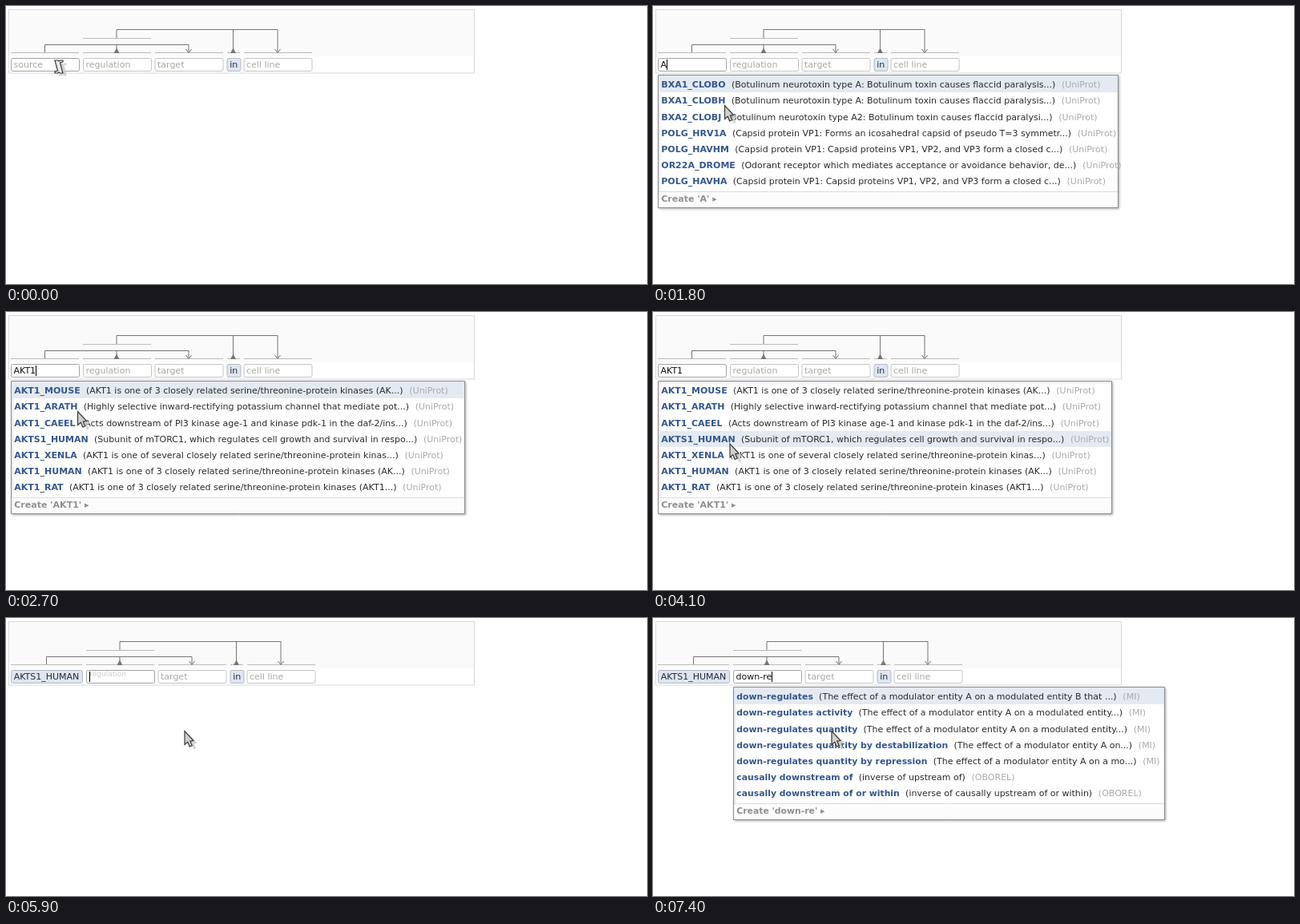
An HTML page with a canvas for the animation above (8000 ms loop, 800 by 348 pixels).

```html
<!DOCTYPE html>
<html lang="en">
<head>
<meta charset="utf-8">
<title>Sentence editor with autocomplete</title>
<style>
html, body { margin: 0; width: 100%; height: 100%; overflow: hidden; background: #fff; }
canvas { display: block; }
</style>
</head>
<body>
<canvas id="stage" width="800" height="348"></canvas>
<script>
const ctx = document.getElementById('stage').getContext('2d');
const LOOP = 8000, STEP = 100;
const FAMILY = '"DejaVu Sans", Verdana, sans-serif';
const ROW_TOP = 88, ROW_H = 20.2;
const GREY = '#757575';

// Suggestion lists: rows are [id, description, origin]
const uni = rows => rows.map(r => [...r, '(UniProt)']);
const lists = {
  A: { right: 581, bold: 11, rows: uni([
    ['BXA1_CLOBO', '(Botulinum neurotoxin type A: Botulinum toxin causes flaccid paralysis...)'],
    ['BXA1_CLOBH', '(Botulinum neurotoxin type A: Botulinum toxin causes flaccid paralysis...)'],
    ['BXA2_CLOBJ', '(Botulinum neurotoxin type A2: Botulinum toxin causes flaccid paralysi...)'],
    ['POLG_HRV1A', '(Capsid protein VP1: Forms an icosahedral capsid of pseudo T=3 symmetr...)'],
    ['POLG_HAVHM', '(Capsid protein VP1: Capsid proteins VP1, VP2, and VP3 form a closed c...)'],
    ['OR22A_DROME', '(Odorant receptor which mediates acceptance or avoidance behavior, de...)'],
    ['POLG_HAVHA', '(Capsid protein VP1: Capsid proteins VP1, VP2, and VP3 form a closed c...)']]) },
  AKT1: { right: 573, bold: 11, rows: uni([
    ['AKT1_MOUSE', '(AKT1 is one of 3 closely related serine/threonine-protein kinases (AK...)'],
    ['AKT1_ARATH', '(Highly selective inward-rectifying potassium channel that mediate pot...)'],
    ['AKT1_CAEEL', '(Acts downstream of PI3 kinase age-1 and kinase pdk-1 in the daf-2/ins...)'],
    ['AKTS1_HUMAN', '(Subunit of mTORC1, which regulates cell growth and survival in respo...)'],
    ['AKT1_XENLA', '(AKT1 is one of several closely related serine/threonine-protein kinas...)'],
    ['AKT1_HUMAN', '(AKT1 is one of 3 closely related serine/threonine-protein kinases (AK...)'],
    ['AKT1_RAT', '(AKT1 is one of 3 closely related serine/threonine-protein kinases (AKT1...)']]) },
  down: { right: 688, bold: 10.83, rows: [
    ['does not overlap sequence of', '(x does not overlaps the sequence of x if and only i...)', '(OBOREL)'],
    ['downstream in neural circuit with', '(A relation that holds between a neuron that is...)', '(OBOREL)'],
    ['causally downstream of', '(inverse of upstream of)', '(OBOREL)'],
    ['causally downstream of or within', '(inverse of causally upstream of or within)', '(OBOREL)'],
    ['immediately causally downstream of', '', '(OBOREL)'],
    ['is downstream of sequence of', '(x is downstream of the sequence of y iff either (1)...)', '(OBOREL)'],
    ['is immediately downstream of sequence of', '(x is immediately downstream of the sequ...)', '(OBOREL)']] },
  regulates: { right: 639, bold: 10.83, rows: [
    ['down-regulates', '(The effect of a modulator entity A on a modulated entity B that ...)', '(MI)'],
    ['down-regulates activity', '(The effect of a modulator entity A on a modulated entity...)', '(MI)'],
    ['down-regulates quantity', '(The effect of a modulator entity A on a modulated entity...)', '(MI)'],
    ['down-regulates quantity by destabilization', '(The effect of a modulator entity A on...)', '(MI)'],
    ['down-regulates quantity by repression', '(The effect of a modulator entity A on a mo...)', '(MI)'],
    ['causally downstream of', '(inverse of upstream of)', '(OBOREL)'],
    ['causally downstream of or within', '(inverse of causally upstream of or within)', '(OBOREL)']] }
};
lists.AKT = { ...lists.AKT1, rows: [3, 0, 1, 2, 5, 6, 4].map(i => lists.AKT1.rows[i]) };

// What is typed and which list is open: [time, text, list]
const typing = [
  [0, ''], [1700, 'A'], [1800, 'A', 'A'], [1900, 'AK', 'A'], [2000, 'AK', 'AKT'],
  [2200, 'AKT', 'AKT'], [2700, 'AKT1', 'AKT1'], [5500, ''],
  [6500, 'd'], [6600, 'd', 'down'], [6700, 'do', 'down'], [6800, 'dow', 'down'],
  [7000, 'down', 'down'], [7100, 'down-', 'regulates'], [7300, 'down-r', 'regulates'],
  [7400, 'down-re', 'regulates']
];

// Pointer path: [time, x, y]
const path = [
  [0, 66, 76], [100, 65, 74], [500, 65, 74], [1000, 89.5, 124.5], [3600, 89.5, 124.5],
  [4100, 96, 165], [4200, 96, 165], [4400, 150, 158], [4700, 276, 175],
  [5000, 223, 160], [5400, 223, 160], [5900, 223, 141.5], [LOOP, 223, 141.5]
];

function pointerAt(t) {
  const i = path.findIndex(p => p[0] > t);
  const [t0, x0, y0] = path[i - 1], [t1, x1, y1] = path[i];
  const k = (t - t0) / (t1 - t0);
  return [x0 + (x1 - x0) * k, y0 + (y1 - y0) * k];
}

// Draws text and returns the x where it ends
function text(str, x, y, color, size = 11, weight = '') {
  ctx.font = `${weight} ${size}px ${FAMILY}`;
  ctx.fillStyle = color;
  ctx.fillText(str, x, y);
  return x + ctx.measureText(str).width;
}

function line(color, ...pts) {
  ctx.strokeStyle = color;
  ctx.lineWidth = 1;
  ctx.beginPath();
  pts.forEach(([x, y]) => ctx.lineTo(x, y));
  ctx.stroke();
}

function shape(pts, fill, stroke) {
  ctx.beginPath();
  pts.forEach(([x, y]) => ctx.lineTo(x, y));
  ctx.closePath();
  ctx.fillStyle = fill;
  ctx.fill();
  if (!stroke) return;
  ctx.strokeStyle = stroke;
  ctx.lineWidth = 1.2;
  ctx.stroke();
}

function box(x, y, w, h, fill, stroke, r = 2) {
  ctx.beginPath();
  ctx.roundRect(x, y, w, h, r);
  ctx.fillStyle = fill;
  ctx.fill();
  ctx.strokeStyle = stroke;
  ctx.lineWidth = 1;
  ctx.stroke();
}

function connectors(cx, d) {
  const [src, reg, tgt, link, cell] = cx;
  line('#bbb', [96 + d, 40.5], [181 + d, 40.5]);
  line(GREY, [reg, 40], [reg, 29.5], [cell, 29.5], [cell, 58]);
  line(GREY, [link, 29.5], [link, 54]);
  line(GREY, [src, 58], [src, 48.5], [tgt, 48.5], [tgt, 58]);
  line(GREY, [reg, 48.5], [reg, 54]);
  for (const x of [reg, link]) shape([[x, 52.5], [x + 3.5, 59], [x - 3.5, 59]], GREY);
  for (const x of [tgt, cell]) line(GREY, [x - 3.5, 54], [x, 58.5], [x + 3.5, 54]);
}

function field(x, label, state) {
  box(x, 65.5, 85, 16, '#fff', state.dark ? '#a2a2a2' : '#c4c4c4');
  if (state.value) text(state.value, x + 3, 77, '#111');
  else if (state.focus) text(label, x + 3.7, 73, '#ccc', 9);
  else text(label, x + 3, 77, '#a9a9a0');
  if (state.caret) {
    ctx.font = `11px ${FAMILY}`;
    const end = x + 3 + ctx.measureText(state.value).width;
    ctx.fillStyle = '#000';
    ctx.fillRect(Math.round(end), 67, 1, 13);
  }
}

function tag(x, w, label) {
  box(x, 65.5, w, 16, '#dfe6f0', '#b4bac6');
  text(label, x + 3.2, 77, '#222b3a');
}

function menu(x, { right, bold, rows }, typed, selected) {
  ctx.save();
  ctx.shadowColor = 'rgba(0,0,0,.3)';
  ctx.shadowBlur = 3;
  ctx.shadowOffsetX = ctx.shadowOffsetY = 1;
  box(x, 86.5, right - x - .5, 166, '#fff', '#8c8c8c', 0);
  ctx.restore();
  ctx.fillStyle = '#fcfcfc';
  ctx.fillRect(x + .5, 233, right - x - 1.5, 19);
  line('#ddd', [x + .5, 232.5], [right - 1, 232.5]);
  ctx.fillStyle = '#e4eaf2';
  ctx.fillRect(x + .5, Math.round(ROW_TOP + selected * ROW_H), right - x - 1.5, 20);
  rows.forEach(([id, about, origin], i) => {
    const y = Math.round(102.2 + i * ROW_H);
    let end = text(id, x + 3.8, y, '#34568f', bold, 'bold') + 7.3;
    if (about) end = text(about, end, y, '#2a2a2a') + 7.7;
    text(origin, end, y, '#aaa');
  });
  text(`Create '${typed}' ▸`, x + 3.8, 245, '#8f8f8f', bold, 'bold');
}

function pointer(x, y, beam) {
  const half = [[-5, -8], [-1.5, -8], [0, -7], [1.5, -8], [5, -8], [5, -6], [1.5, -5]];
  const pts = beam
    ? [...half, ...half.map(([a, b]) => [-a, -b])]
    : [[0, 0], [0, 17], [3.8, 13.7], [6.3, 19.5], [9.3, 18.2], [6.8, 12.6], [11, 12]];
  const at = (dx, dy) => pts.map(([a, b]) => [x + a + dx, y + b + dy]);
  shape(at(5, 3.5), 'rgba(205,205,205,.85)');
  shape(at(0, 0), beam ? '#e8e8e8' : '#cfcfcf', '#3a3a3a');
}

function draw(t) {
  const [px, py] = pointerAt(t);
  const [, value, open] = typing.filter(k => k[0] <= t).pop();
  const chosen = t >= 5500;
  const d = chosen ? 4 : 0;
  const focus = t >= 700;
  const caret = focus && (t < 3700 || t >= 5300);

  ctx.fillStyle = '#fff';
  ctx.fillRect(0, 0, 800, 348);
  box(3.5, 4.5, 581, 79.5, '#fff', '#d6d9de', 0);
  ctx.fillStyle = '#fafafa';
  ctx.fillRect(4, 5, 580, 58);

  const spans = [[6, 91 + d], [96 + d, 181 + d], [186 + d, 271 + d], [276 + d, 292 + d], [297 + d, 382 + d]];
  for (const [a, b] of spans) line('#bbb', [a, 58.5], [b, 58.5]);
  connectors([chosen ? 50.5 : 48.5, 138.5 + d - .5, 228 + d, 283.5 + d, 339 + d], d);

  const active = { value, focus, caret, dark: true };
  if (chosen) tag(6.5, 89, 'AKTS1_HUMAN');
  else field(6.5, 'source', active);
  field(96.5 + d, 'regulation', chosen ? active : {});
  field(186.5 + d - .5, 'target', {});
  tag(276.5 + d - .5, 17, 'in');
  field(297 + d, 'cell line', {});

  if (open) {
    const hovered = t < 3700 || chosen ? 0 : Math.min(3, Math.floor((py - ROW_TOP) / ROW_H));
    menu(chosen ? 100.5 : 6.5, lists[open], value, hovered);
  }
  pointer(px, py, py < 83);
}

function tick(now) {
  draw(Math.floor(now % LOOP / STEP) * STEP);
  requestAnimationFrame(tick);
}
draw(0);
requestAnimationFrame(tick);
</script>
</body>
</html>
```
